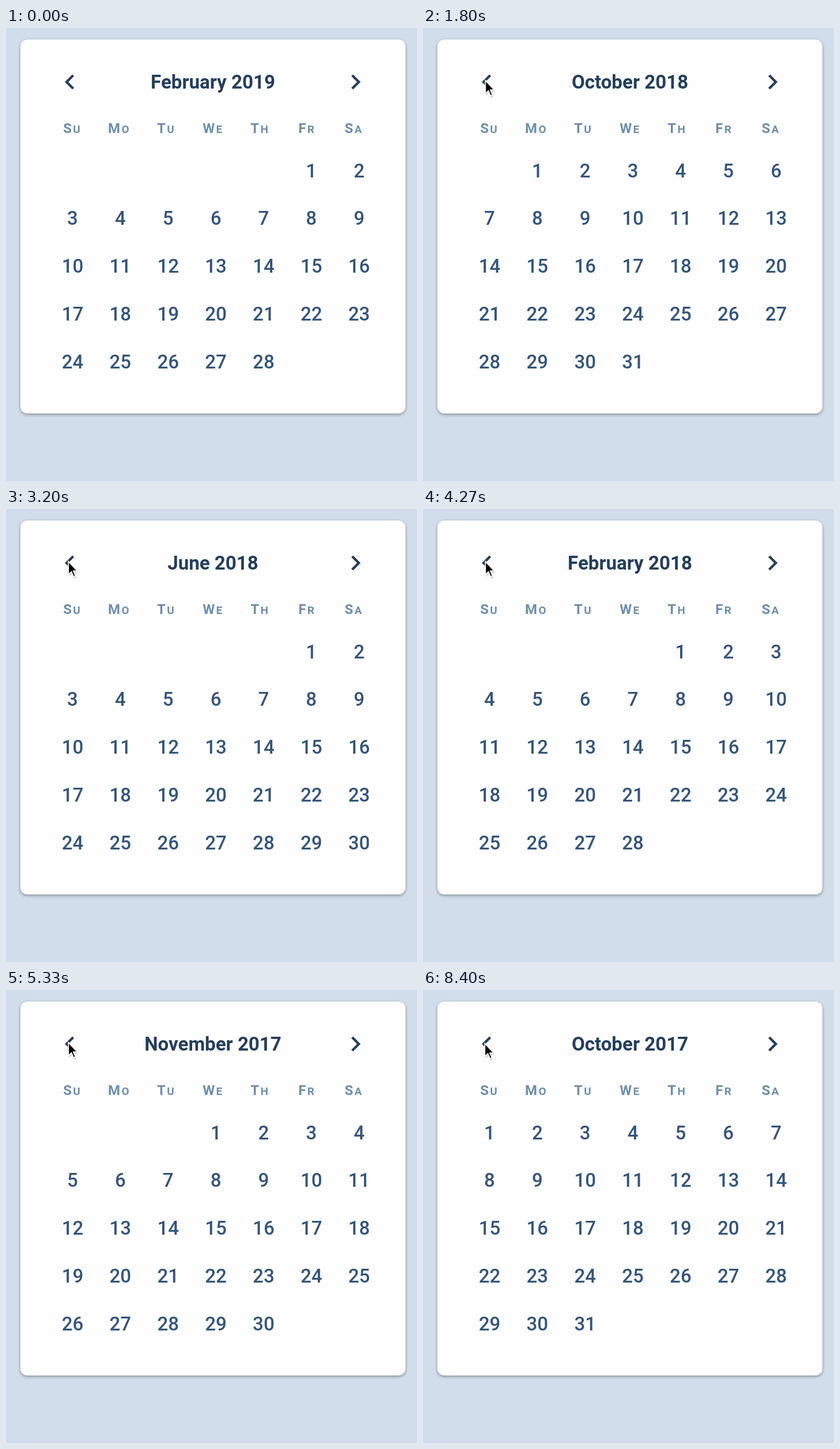
Write an HTML page that moves like this. It is 713 px wide and 785 px high and loops after 8.54 s.

```html
<!DOCTYPE html>
<html lang="en">
<head>
<meta charset="utf-8">
<title>Calendar</title>
<style>
  html, body { margin: 0; width: 100%; height: 100%; overflow: hidden; background: #d1ddea; }
  svg { position: absolute; left: 0; top: 0; width: 713px; height: 785px; }
  #card {
    position: absolute; left: 25px; top: 20px; width: 668px; border-radius: 12px; background: #fefefe;
    box-shadow: 0 2px 6px rgba(0, 0, 0, .14), 0 2px 4px rgba(0, 0, 0, .24);
  }
  text { font-family: Roboto, sans-serif; text-anchor: middle; }
  #title { font-size: 33.1px; font-weight: 600; fill: #243f5b; }
  #week text { font-size: 24px; font-weight: 600; letter-spacing: 2.4px; fill: #6d8eac; }
  #week tspan { font-size: 19px; }
  #days text { font-size: 33.1px; font-weight: 500; fill: #34557a; }
  #arrows { fill: #243f5b; }
</style>
</head>
<body>
<div id="card"></div>
<svg viewBox="0 0 713 785">
  <g id="arrows">
    <path transform="translate(84.7 67.5) scale(2.17)" d="M15.41 7.41L14 6l-6 6 6 6 1.41-1.41L10.83 12z"/>
    <path transform="translate(580.4 67.5) scale(2.17)" d="M10 6L8.59 7.41 13.17 12l-4.58 4.59L10 18l6-6z"/>
  </g>
  <text id="title" x="359" y="105"></text>
  <g id="week"></g>
  <g id="days"></g>
  <g id="cursor">
    <path d="M0 0V24L5.4 19L9 27.6L13.2 25.8L9.6 17.4H16.6Z" transform="translate(.5 2)" fill="#000" opacity=".22" style="filter: blur(1.3px)"/>
    <path d="M0 0V22.5L5.2 17.6L8.8 26.2L12.2 24.8L8.6 16.4H15.4Z" fill="#000" stroke="#fff" stroke-width="1.7"/>
  </g>
</svg>
<script>
const LOOP = 8540;
const MONTHS = ['January', 'February', 'March', 'April', 'May', 'June', 'July',
  'August', 'September', 'October', 'November', 'December'];
// Each click steps one month back from February 2019.
const CLICKS = [870, 1070, 1270, 1530, 2200, 2470, 2730, 3000, 3330, 3670,
  4000, 4270, 4600, 5000, 5330, 5730];
const CELL = 82.85;

const $ = id => document.getElementById(id);
const clamp = v => Math.min(1, Math.max(0, v));
const mix = (a, b, k) => a + (b - a) * k;

function addText(parent, x, y) {
  const el = document.createElementNS('http://www.w3.org/2000/svg', 'text');
  el.setAttribute('x', x);
  el.setAttribute('y', y);
  return parent.appendChild(el);
}

['Su', 'Mo', 'Tu', 'We', 'Th', 'Fr', 'Sa'].forEach((name, i) => {
  addText($('week'), 115.2 + i * 81.4, 182).innerHTML =
    `${name[0]}<tspan>${name[1].toUpperCase()}</tspan>`;
});

const cells = Array.from({ length: 42 }, (_, i) =>
  addText($('days'), 115.5 + (i % 7) * CELL, 258.6 + Math.floor(i / 7) * CELL));

let shown = -1;
function showMonth(back) {
  if (back === shown) return;
  shown = back;
  const first = new Date(2019, 1 - back, 1);
  const year = first.getFullYear(), month = first.getMonth();
  const offset = first.getDay();
  const count = new Date(year, month + 1, 0).getDate();
  $('title').textContent = `${MONTHS[month]} ${year}`;
  cells.forEach((cell, i) => {
    const day = i - offset + 1;
    cell.textContent = day > 0 && day <= count ? day : '';
  });
  const rows = Math.ceil((offset + count) / 7);
  $('card').style.height = (rows > 5 ? 731 : 648) + 'px';
}

function moveCursor(t) {
  const enter = 1 - (1 - clamp((t - 30) / 700)) ** 2;
  const drift = clamp((t - 7600) / 800);
  const x = mix(-18, 108.3, enter) - drift;
  const y = mix(95, 91, enter) + 1.7 * drift;
  $('cursor').setAttribute('transform', `translate(${x} ${y})`);
}

function render(t) {
  showMonth(CLICKS.filter(c => t >= c).length);
  moveCursor(t);
}

function tick() {
  render(performance.now() % LOOP);
  requestAnimationFrame(tick);
}
tick();
</script>
</body>
</html>
```
